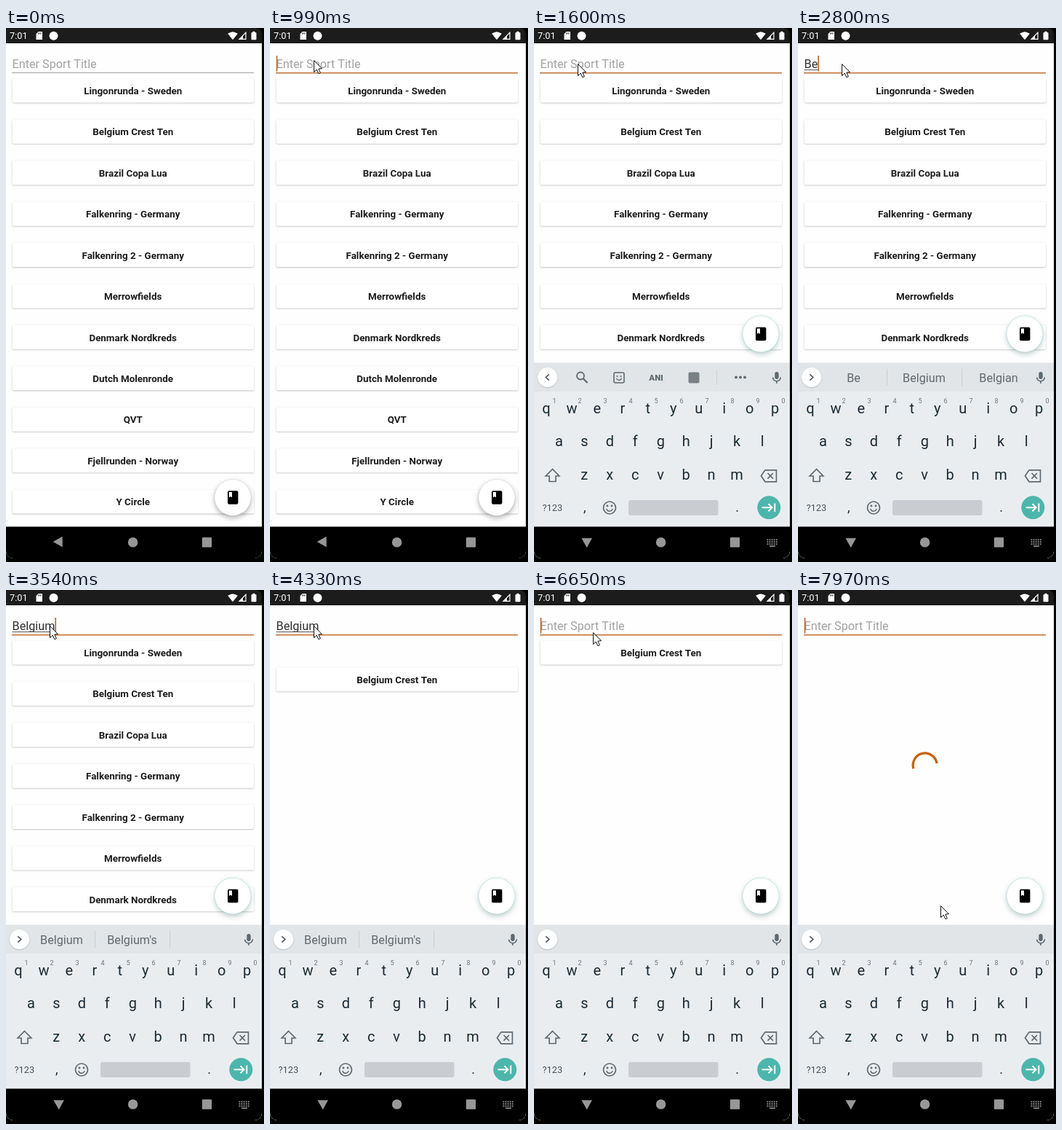
Write an HTML page with a canvas that moves like this. It is 355x733 px and loops after 8000 ms.

```html
<!DOCTYPE html>
<html lang="en">
<head>
<meta charset="utf-8">
<title>League search</title>
<style>
html, body { margin: 0; width: 100%; height: 100%; overflow: hidden; background: #000; }
canvas { display: block; width: 355px; height: 733px; }
</style>
</head>
<body>
<canvas id="stage"></canvas>
<script>
const W = 355, H = 733, LOOP = 8000;
const canvas = document.getElementById('stage');
const c = canvas.getContext('2d');
const k = Math.max(1, window.devicePixelRatio || 1);
canvas.width = W * k;
canvas.height = H * k;

const LEAGUES = [
  'Lingonrunda - Sweden', 'Belgium Crest Ten', 'Brazil Copa Lua',
  'Falkenring - Germany', 'Falkenring 2 - Germany', 'Merrowfields',
  'Denmark Nordkreds', 'Dutch Molenronde', 'QVT', 'Fjellrunden - Norway', 'Y Circle'
];
const ORANGE = '#c8793f', INK = '#1a2b32', ICON = '#5f696e';
const ROW = 56.42, FIRST_ROW = 86;
const RESIZE = 1320, SETTLED = 1550, LOAD = 7600;

// [time, x, y] of the pointer tip
const POINTER = [
  [160, 289, 680], [560, 46, 92], [660, 57, 40], [760, 60, 44], [1460, 60, 44], [1600, 60, 49],
  [4690, 60, 49], [5070, 81, 58], [7160, 81, 58], [7350, 122, 82], [7600, 126, 86],
  [7920, 147, 298], [7970, 196, 433]
];
// [time, field text]
const TYPING = [
  [0, ''], [2710, 'B'], [2800, 'Be'], [2890, 'Bel'], [3010, 'Belg'], [3130, 'Belgi'],
  [3310, 'Belgiu'], [3540, 'Belgium'], [5960, 'Belgiu'], [6470, 'Belgi'],
  [6515, 'Belg'], [6560, 'Bel'], [6605, 'B'], [6650, '']
];
// [time, caret shown]
const CARET = [
  [0, 0], [990, 1], [1600, 0], [2110, 1], [2620, 0], [2710, 1], [4050, 0],
  [4560, 1], [5070, 0], [5530, 1], [7160, 0], [7670, 1]
];

const clamp = v => Math.min(1, Math.max(0, v));
const span = (t, a, b) => clamp((t - a) / (b - a));
const smooth = u => u * u * (3 - 2 * u);
const mix = (a, b, u) => a + (b - a) * u;
const at = (steps, t) => steps.filter(s => s[0] <= t).pop()[1];

function keyed(keys, t) {
  let i = 0;
  while (i < keys.length - 2 && t >= keys[i + 1][0]) i++;
  const a = keys[i], b = keys[i + 1], u = smooth(span(t, a[0], b[0]));
  return [mix(a[1], b[1], u), mix(a[2], b[2], u)];
}

function text(s, x, y, size, color, align = 'center', weight = 400) {
  c.font = `${weight} ${size}px Roboto, sans-serif`;
  c.textAlign = align;
  c.fillStyle = color;
  c.fillText(s, x, y);
}
function rect(x, y, w, h, color) {
  c.fillStyle = color;
  c.fillRect(x, y, w, h);
}
function box(x, y, w, h, r, color) {
  c.beginPath();
  c.roundRect(x, y, w, h, r);
  c.fillStyle = color;
  c.fill();
}
function disc(x, y, r, color) {
  c.beginPath();
  c.arc(x, y, r, 0, 7);
  c.fillStyle = color;
  c.fill();
}
function trace(pts, closed) {
  c.beginPath();
  pts.forEach(p => c.lineTo(p[0], p[1]));
  if (closed) c.closePath();
}
function poly(pts, color) {
  trace(pts, true);
  c.fillStyle = color;
  c.fill();
}
function stroke(color, width) {
  c.strokeStyle = color;
  c.lineWidth = width;
  c.stroke();
}
function line(pts, color, width, closed) {
  trace(pts, closed);
  stroke(color, width);
}
function ring(x, y, r, color, width, from = 0, to = Math.PI * 2) {
  c.beginPath();
  c.arc(x, y, r, from, to);
  stroke(color, width);
}
function shadow(color, blur, dy) {
  c.shadowColor = color;
  c.shadowBlur = blur * k;
  c.shadowOffsetY = dy * k;
}
const noShadow = () => shadow('transparent', 0, 0);

function statusBar() {
  box(0, 0, 352, 21, [0, 8, 0, 0], '#1c1c1c');
  text('7:01', 5, 15, 12.8, '#fff', 'left');
  poly([[44.5, 5], [50, 5], [50, 16], [41.5, 16], [41.5, 8]], '#fff');
  for (let i = 0; i < 3; i++) rect(44 + i * 1.8, 6.3, 0.9, 2.2, '#1c1c1c');
  disc(65.5, 10.7, 6, '#fff');
  c.beginPath();
  c.moveTo(312, 16.3);
  c.lineTo(305.2, 7.8);
  c.quadraticCurveTo(312, 2.6, 318.8, 7.8);
  c.closePath();
  c.fillStyle = '#fff';
  c.fill();
  line([[321, 15.3], [330, 15.3], [330, 6.3]], '#fff', 1.2, true);
  poly([[320, 16], [326, 10], [326, 16]], '#fff');
  box(337.5, 6, 7, 10.3, 1, '#fff');
  rect(339.5, 4.7, 3, 2, '#fff');
}

function field(t) {
  const value = at(TYPING, t), focused = t >= 990;
  if (focused) rect(8, 60.8, 333, 1.7, ORANGE);
  else rect(8, 61, 333, 1, '#a0a0a0');
  text(value || 'Enter Sport Title', 8.6, 55, 16.2, value ? '#2f2f2f' : '#a2a2a2', 'left');
  const end = 8.6 + (value ? c.measureText(value).width : 0);
  if (value) rect(8.6, 57, end - 8.6, 1, '#555');
  if (at(CARET, t)) rect(end, 38, 1.7, 21.5, '#bd6a30');
}

function card(name, y) {
  shadow('rgba(0,0,0,.24)', 2.2, 0.8);
  box(8.5, y - 16.8, 332.5, 33.2, 2, '#fff');
  noShadow();
  text(name, 174.7, y + 5, 13.4, '#1c1c1c', 'center', 700);
}

function list(t) {
  if (t >= LOAD) return;
  const fade = 1 - span(t, 4090, 4220);
  const lift = smooth(span(t, 4220, 4500));
  LEAGUES.forEach((name, i) => {
    const kept = i === 1, y = FIRST_ROW + ROW * i;
    c.globalAlpha = kept ? 1 : fade;
    if (c.globalAlpha > 0) card(name, kept ? y - ROW * lift : y);
  });
  c.globalAlpha = 1;
}

function spinner(t) {
  if (t < LOAD) return;
  const rad = Math.PI / 180;
  const start = 163 + (t - 7970) * 0.228;
  const sweep = Math.max(8, 270 * smooth(span(t, 7610, 8180)));
  ring(174.7, 240.5, 16.5, '#c4630f', 3.3, start * rad, (start + sweep) * rad);
}

function fab(raised) {
  const y = raised ? 420 : 644.5;
  shadow(raised ? 'rgba(20,80,75,.28)' : 'rgba(0,0,0,.3)', 7, 3);
  disc(312, y, 25, '#fff');
  noShadow();
  ring(312, y, 25, raised ? 'rgba(77,182,172,.35)' : 'rgba(0,0,0,.1)', 0.8);
  box(305, y - 9.2, 14.4, 18.4, 2, '#000');
  poly([[306.8, y - 7.5], [311, y - 7.5], [311, y], [308.9, y - 1.6], [306.8, y]], '#fff');
}

function mic() {
  box(331.3, 472, 5.4, 10, 2.7, ICON);
  ring(334, 479.5, 5.3, ICON, 1.6, 0, Math.PI);
  rect(333.2, 485, 1.6, 3, ICON);
}

function tools() {
  ring(64, 477.5, 5, ICON, 1.8);
  line([[67.7, 481.2], [73.5, 487]], ICON, 2.2);
  c.beginPath();
  c.roundRect(110, 473, 14, 14, 2);
  stroke(ICON, 1.6);
  disc(114.5, 478, 1.1, ICON);
  disc(119.5, 478, 1.1, ICON);
  ring(117, 480, 3.5, ICON, 1.4, 0.2, 2.9);
  text('ANI', 168, 483.8, 11.5, ICON, 'center', 900);
  box(212.5, 472.5, 15, 15, 2, '#788186');
  rect(251, 469, 1, 21, '#cdd1d4');
  for (let i = -1; i < 2; i++) disc(284 + i * 6, 479.5, 1.9, ICON);
}

function suggestions(value) {
  const done = value === 'Belgium';
  const words = done ? ['Belgium', "Belgium's"] : [value, 'Belgium', 'Belgian'];
  words.forEach((w, i) => text(w, [76.5, 173.5, 276][i], 486, 16.2, '#62696d'));
  rect(122, 468, 1, 23, '#c9cdd0');
  rect(225, 468, 1, 23, '#c9cdd0');
}

function toggle(open) {
  const alpha = c.globalAlpha, d = open ? -2.2 : 2.2;
  c.globalAlpha = 1;
  shadow('rgba(0,0,0,.2)', 2, 0.7);
  disc(18.5, 479.5, 13.5, '#fff');
  noShadow();
  c.globalAlpha = alpha;
  line([[18.5 - d, 475.3], [18.5 + d, 479.5], [18.5 - d, 483.7]], '#515b60', 1.7);
}

function toolbar(t) {
  const open = t >= 1490 && t < 2710;
  rect(0, 459.5, 352, 39.5, '#e1e5e8');
  toggle(open);
  mic();
  if (open) tools();
  else if (t < 2710) text('gfgfgf', 174, 486, 16.2, '#7b8286');
  else if (t < 6470) suggestions(t >= 5960 ? 'Belgium' : at(TYPING, t));
}

function keys() {
  rect(0, 499, 352, 230, '#eaedf0');
  const row = (s, x, y) => [...s].forEach((ch, i) => text(ch, x + i * 34.95, y, 20, INK));
  row('qwertyuiop', 17, 529);
  row('asdfghjkl', 34.5, 574);
  row('zxcvbnm', 69.3, 620);
  [...'1234567890'].forEach((n, i) => text(n, 28 + i * 35, 515, 9, '#6a7277'));

  line([[25.5, 605.5], [34.8, 615], [30, 615], [30, 622.5], [21, 622.5], [21, 615], [16.2, 615]], ICON, 1.7, true);
  line([[312.5, 614.8], [318, 606.8], [333.5, 606.8], [333.5, 622.8], [318, 622.8]], ICON, 1.7, true);
  line([[321.5, 611], [329, 618.6]], ICON, 1.7);
  line([[329, 611], [321.5, 618.6]], ICON, 1.7);

  text('?123', 25.3, 663, 12.8, '#48545a');
  text(',', 69.8, 664, 18, INK);
  ring(104, 658.5, 8.5, ICON, 1.7);
  disc(101, 656, 1.4, ICON);
  disc(107, 656, 1.4, ICON);
  ring(104, 659, 4.3, ICON, 1.5, 0.25, 2.9);
  box(130, 648, 123.5, 21, 3, '#c9ccd0');
  text('.', 279.5, 664, 18, INK);
  disc(323.3, 658.3, 16, '#4db6ac');
  line([[313.5, 658.3], [327, 658.3]], '#fff', 2);
  line([[322.5, 653.3], [327.5, 658.3], [322.5, 663.3]], '#fff', 2);
  rect(330.3, 652.5, 2, 11.6, '#fff');
}

function keyboard(t) {
  if (t < RESIZE) return;
  const u = span(t, RESIZE, SETTLED);
  c.save();
  c.beginPath();
  c.rect(0, 21, 352, 707);
  c.clip();
  c.globalAlpha = mix(0.28, 1, u);
  c.translate(0, 225 * Math.pow(1 - u, 2.05));
  keys();
  toolbar(t);
  c.restore();
}

function navBar(t) {
  const moving = t >= RESIZE && t < SETTLED;
  const gray = moving ? '#b4b4b4' : '#979797';
  rect(0, 684.5, 352, 44, moving ? 'rgba(0,0,0,.5)' : '#000');
  c.save();
  c.translate(72.7, 705.2);
  c.rotate(mix(Math.PI, Math.PI * 2.5, span(t, 1260, 1500)));
  poly([[8, 0], [-5, -7.3], [-5, 7.3]], gray);
  c.restore();
  disc(174.6, 706, 6.8, gray);
  box(269.8, 699.3, 13.2, 13.4, 1, gray);
  if (t < RESIZE) return;
  for (let y = 0; y < 3; y++)
    for (let x = 0; x < 5; x++) rect(320.5 + x * 3.1, 701.5 + y * 3, 1.8, 1.8, gray);
  rect(324, 710.5, 8, 1.5, gray);
}

function pointer(t) {
  if (t < 160) return;
  const [x, y] = keyed(POINTER, t);
  c.save();
  c.translate(x + 0.5, y + 0.5);
  const shape = [[0, 0], [0, 16], [3.8, 12.6], [6.4, 18.2], [8.8, 17.1], [6.3, 11.6], [11, 11.2]];
  poly(shape, '#fff');
  line(shape, '#111', 1, true);
  c.restore();
}

function screen(t) {
  c.save();
  c.beginPath();
  c.roundRect(0, 0, 352, 728, [0, 8, 10, 10]);
  c.clip();
  rect(0, 21, 352, 707, '#fefefe');
  statusBar();
  c.save();
  c.beginPath();
  c.rect(0, 21, 352, t < RESIZE ? 663 : 438.5);
  c.clip();
  field(t);
  list(t);
  spinner(t);
  fab(t >= RESIZE);
  c.restore();
  keyboard(t);
  navBar(t);
  c.restore();
}

function draw() {
  const t = performance.now() % LOOP;
  c.setTransform(k, 0, 0, k, 0, 0);
  rect(0, 0, W, H, '#000');
  screen(t);
  pointer(t);
  requestAnimationFrame(draw);
}
draw();
</script>
</body>
</html>
```
